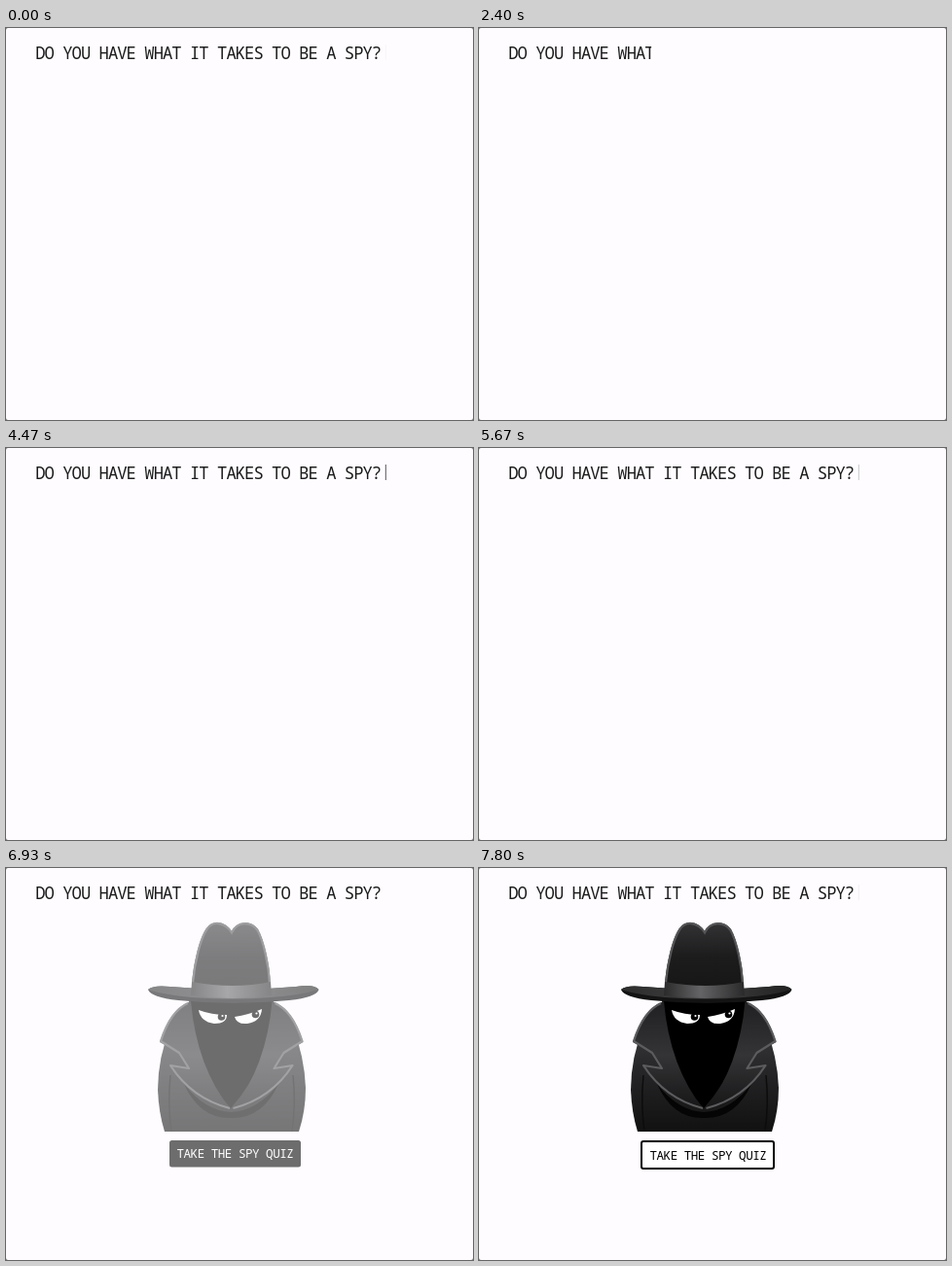
An HTML page that plays this animation: 480x403 px, repeating every 8000 ms.

```html
<!DOCTYPE html>
<html lang="en">
<head>
<meta charset="utf-8">
<title>Spy quiz</title>
<style>
  html, body { margin: 0; width: 100%; height: 100%; overflow: hidden; background: #666; }
  #stage { position: absolute; inset: 0; background: #fefcff; border-radius: 2px; overflow: hidden; }
  svg { position: absolute; left: 0; top: 0; display: block; }
  text { font-family: "Noto Sans Mono", "DejaVu Sans Mono", monospace; font-stretch: condensed; font-weight: 500; white-space: pre; }
  #title { font-size: 17.2px; letter-spacing: -.97px; fill: #1c1c1c; }
  .label { font-size: 12.6px; letter-spacing: -.51px; }
</style>
</head>
<body>
<div id="stage">
  <svg id="head" width="392" height="40">
    <text id="title" x="30.2" y="31.5">DO YOU HAVE WHAT IT TAKES TO BE A SPY?</text>
    <rect id="caret" x="389.8" y="17" width="1.1" height="16" fill="#666"/>
  </svg>

  <svg id="spy" width="480" height="403" viewBox="0 0 480 403">
    <defs>
      <linearGradient id="coat" x1="0" y1="0" x2="0" y2="1">
        <stop offset="0" stop-color="#3a3a3c"/><stop offset=".5" stop-color="#232325"/><stop offset="1" stop-color="#111"/>
      </linearGradient>
      <linearGradient id="lapel" x1="0" y1="0" x2="0" y2="1">
        <stop offset="0" stop-color="#202022"/><stop offset=".5" stop-color="#343436"/><stop offset="1" stop-color="#161617"/>
      </linearGradient>
      <linearGradient id="crown" x1="0" y1="0" x2="0" y2="1">
        <stop offset="0" stop-color="#333335"/><stop offset=".5" stop-color="#1c1c1d"/><stop offset="1" stop-color="#161616"/>
      </linearGradient>
      <linearGradient id="band">
        <stop offset="0" stop-color="#2a2a2b"/><stop offset=".45" stop-color="#646466"/><stop offset="1" stop-color="#2a2a2b"/>
      </linearGradient>
      <linearGradient id="brim">
        <stop offset="0" stop-color="#2c2c2d"/><stop offset=".5" stop-color="#404042"/><stop offset="1" stop-color="#222"/>
      </linearGradient>
      <!-- left half of the collar; the right half is its mirror -->
      <g id="collar">
        <path d="M190 137Q169 144 158 179L178 190L189 207L168 203Q190 238 231 248Q196 205 190 137Z" fill="url(#lapel)"/>
        <path d="M187 139Q169 147 159 178L178 190L188 206L169 203Q191 237 230 247" fill="none" stroke="#5c5c5e" stroke-width="2.2" stroke-linejoin="round"/>
      </g>
    </defs>

    <path d="M170 160Q156 195 156 228Q157 252 163 271H301Q308 250 308 226Q307 195 294 160Z" fill="url(#coat)"/>
    <path d="M169 213Q166 242 170 271M295 213Q298 242 294 271" fill="none" stroke="#0c0c0c" stroke-width="1.4"/>
    <path d="M183 222Q205 250 231 251Q258 250 280 222Q264 258 231 257Q199 258 183 222Z" fill="#050505"/>
    <path d="M188 135H275Q273 200 231 247Q191 205 188 135Z" fill="#000"/>
    <use href="#collar"/>
    <use href="#collar" transform="matrix(-1 0 0 1 463.5 0)"/>

    <g fill="#fff">
      <path d="M198 146Q211 151 227 151Q227 160 214 160Q200 158 198 146Z"/>
      <path d="M235 153Q249 151 263 145Q262 158 248 160Q237 161 235 153Z"/>
    </g>
    <circle cx="221.5" cy="153" r="3.8"/>
    <circle cx="256.5" cy="150.5" r="3.8"/>
    <g fill="#fff">
      <circle cx="222.5" cy="152" r="1.1"/>
      <circle cx="257.5" cy="149.5" r="1.1"/>
    </g>

    <path d="M146 125Q151 120 169 122Q234 128 298 122Q317 119 321.5 125Q319 133 291 136Q234 142 177 136Q149 133 146 125Z" fill="#131314"/>
    <path d="M146 125Q151 120 169 122Q234 128 298 122Q317 119 321.5 125Q302 131 272 133Q234 136 191 133Q161 130 146 125Z" fill="url(#brim)"/>
    <path d="M191 120C193 96 199 72 206 62C212 53 226 54 232 66C238 53 253 54 259 63C266 76 271 100 272 120Q234 132 191 120Z" fill="url(#crown)"/>
    <path d="M192 118C194 96 200 72 206.5 63C212 54 225 55 232 66.5C238 54 252 55 258.5 64C265 76 270 100 271 118" fill="none" stroke="#555557" stroke-width="2.2"/>
    <path d="M191 117Q234 125 272 117L273 131Q234 137 190 131Z" fill="url(#band)"/>

    <g id="plain">
      <rect x="168" y="280" width="135" height="27.5" rx="2.5"/>
      <text class="label" x="175.5" y="298" fill="#fff">TAKE THE SPY QUIZ</text>
    </g>
    <g id="hover">
      <rect x="167" y="281" width="136" height="28" rx="2" fill="#fff" stroke="#000" stroke-width="2"/>
      <text class="label" x="175.5" y="299.5" fill="#000">TAKE THE SPY QUIZ</text>
    </g>
  </svg>
</div>

<script>
  const LOOP = 8000, RIGHT = 392;

  // steps: [time in ms, value]; the first and last values are held to the loop's ends
  function play(id, prop, steps) {
    const all = [[0, steps[0][1]], ...steps, [LOOP, steps[steps.length - 1][1]]];
    const frames = all.map(([ms, value]) => ({ offset: ms / LOOP, [prop]: value }));
    return document.getElementById(id).animate(frames, { duration: LOOP, iterations: Infinity });
  }

  const wipe = [[1130, RIGHT], [1130, 30], [1210, 30], [1930, 124], [2400, 177],
                [2870, 242], [3470, 314.5], [4060, RIGHT]];

  const running = [
    play("head", "clipPath", wipe.map(([ms, edge]) => [ms, `inset(0 ${RIGHT - edge}px 0 0)`])),
    play("spy", "opacity", [[6190, 0], [7490, 1]]),
    play("plain", "opacity", [[7300, 1], [7300, 0]]),
    play("hover", "opacity", [[7300, 0], [7300, 1]]),
    document.getElementById("caret").animate(
      [{ opacity: 0, easing: "ease" }, { opacity: 1, easing: "ease" }, { opacity: 0 }],
      { duration: 1000, delay: -30, iterations: Infinity })
  ];
  const start = document.timeline.currentTime;
  running.forEach(a => { a.startTime = start; });
</script>
</body>
</html>
```
